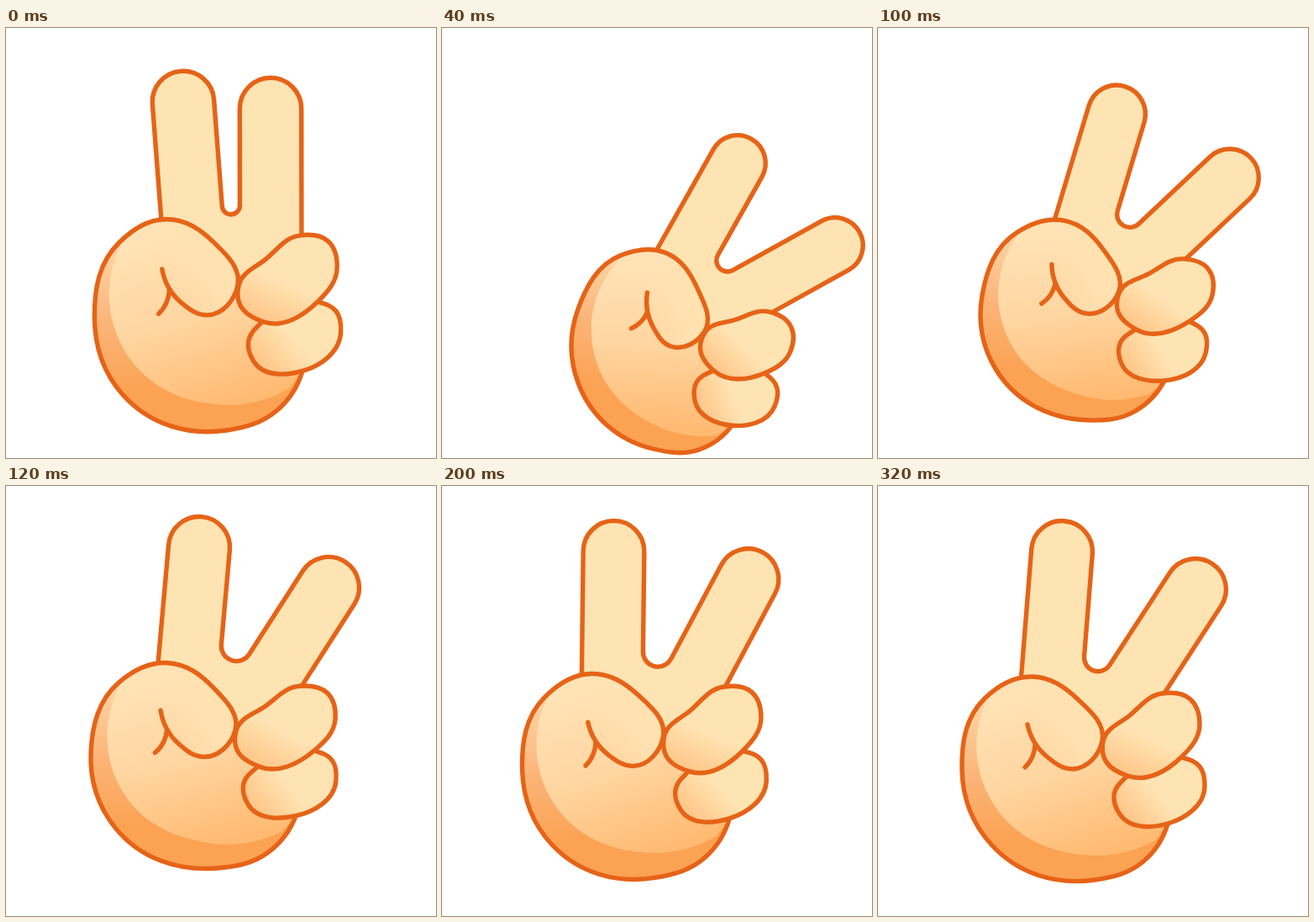
An HTML page with a canvas for the animation above (340 ms loop, 512 by 512 pixels).

```html
<!DOCTYPE html>
<html lang="en">
<head>
<meta charset="utf-8">
<title>Victory hand</title>
<style>
  html, body { margin: 0; width: 100%; height: 100%; overflow: hidden; background: #fff; }
  canvas { display: block; width: 100vw; height: 100vh; }
</style>
</head>
<body>
<canvas id="stage" width="512" height="512"></canvas>
<script>
const ctx = document.getElementById('stage').getContext('2d');
const LOOP = 340, STEP = 20;
const LINE = '#e66317', CREAM = '#ffe4b3';

// Each pose: finger root, palm bottom and right edge place the hand; two tip centres place the fingers.
const poses = [
  { at: 0, hand: [[178, 229], [263, 479], [371, 326]], tips: [[211, 88], [315, 96]] },
  { at: 40, hand: [[255, 264], [251, 501], [384, 411]], tips: [[352, 161], [468, 259]] },
  { at: 80, hand: [[238, 250], [243, 484], [374, 389]], tips: [[332, 140], [450, 236]] },
  { at: 120, hand: [[179, 211], [252, 455], [367, 315]], tips: [[230, 73], [384, 121]] },
  { at: 160, hand: [[160, 219], [252, 461], [355, 308]], tips: [[190, 77], [351, 99]] },
  { at: 240, hand: [[169, 228], [258, 469], [361, 323]], tips: [[219, 78], [378, 123]] }
];
const last = poses.length - 1;
const rest = poses[last].hand;

// Smooth outlines of the resting hand.
const palm = [[178, 284], [202, 323], [232, 337], [267, 303], [238, 254], [183, 227],
  [127, 253], [100, 338], [135, 427], [258, 469], [316, 447], [345, 402]];
const ring = [[268, 304], [300, 273], [338, 247], [372, 254], [383, 284], [361, 323], [297, 345], [269, 323]];
const pinky = [[361, 323], [383, 334], [389, 358], [345, 402], [288, 391], [281, 368], [297, 345]];
const crease = [[187, 307], [184, 322], [175, 335]];
const shadeEdge = [[330, 422], [242, 439], [141, 384], [129, 256]];

const add = (p, q, k = 1) => [p[0] + q[0] * k, p[1] + q[1] * k];
const sub = (p, q) => add(p, q, -1);
const cross = (p, q) => p[0] * q[1] - p[1] * q[0];
const dist = (p, q) => Math.hypot(q[0] - p[0], q[1] - p[1]);
const unit = p => add([0, 0], p, 1 / (Math.hypot(...p) || 1));

// Carries a point of the resting hand to where the three anchors have moved.
function place([o, a, b]) {
  const u = sub(rest[1], rest[0]), v = sub(rest[2], rest[0]), area = cross(u, v);
  return p => {
    const d = sub(p, rest[0]);
    return add(add(o, sub(a, o), cross(d, v) / area), sub(b, o), cross(u, d) / area);
  };
}

// Monotone cubic through the values that pick() reads from the poses.
function tween(pick, t) {
  if (t >= poses[last].at) return pick(poses[last]);
  const span = i => poses[i + 1].at - poses[i].at;
  const slope = i => (pick(poses[i + 1]) - pick(poses[i])) / span(i);
  const tangent = i => {
    if (i === 0) return slope(0);
    if (i === last) return 0;
    const a = slope(i - 1), b = slope(i);
    return a * b <= 0 ? 0 : 2 * a * b / (a + b);
  };
  let i = 0;
  while (t >= poses[i + 1].at) i++;
  const h = span(i), u = (t - poses[i].at) / h, w = 1 - u;
  return pick(poses[i]) * w * w * (1 + 2 * u) + pick(poses[i + 1]) * u * u * (3 - 2 * u)
    + h * u * w * (tangent(i) * w - tangent(i + 1) * u);
}

const pointsAt = (key, t) =>
  rest.slice(0, poses[0][key].length).map((_, i) => [0, 1].map(a => tween(p => p[key][i][a], t)));

// Adds a round curve through pts to a path.
function curve(path, pts, closed = false, join = false) {
  const n = pts.length, at = i => pts[(i + n) % n];
  const turn = i => {
    const a = unit(sub(at(i), at(i - 1))), b = unit(sub(at(i + 1), at(i)));
    const d = dist(at(i), at(i - 1)), e = dist(at(i), at(i + 1));
    return unit(add(add([0, 0], a, e), b, d));
  };
  const mirror = (m, p, q) => {
    const c = unit(sub(q, p));
    return sub(add([0, 0], c, 2 * (c[0] * m[0] + c[1] * m[1])), m);
  };
  const dir = i => {
    if (closed || (i > 0 && i < n - 1)) return turn(i);
    return i ? mirror(turn(n - 2), at(n - 2), at(n - 1)) : mirror(turn(1), at(0), at(1));
  };
  if (join) path.lineTo(...pts[0]); else path.moveTo(...pts[0]);
  for (let i = 0; i < (closed ? n : n - 1); i++) {
    const p = at(i), q = at(i + 1), s = dist(p, q) * 0.36;
    path.bezierCurveTo(...add(p, dir(i), s), ...sub(q, add([0, 0], dir(i + 1), s)), ...q);
  }
  if (closed) path.closePath();
  return path;
}

const smooth = (pts, closed) => curve(new Path2D(), pts, closed);

// Two round-tipped fingers joined by a fillet that ends at the crotch.
function fingers(tips, roots, crotch, r) {
  const squeeze = Math.max(0, (140 - dist(...tips)) / 7);
  const across = unit(sub(roots[1], roots[0]));
  const [a, b] = tips.map((tip, i) => {
    const root = add(roots[i], across, i ? -squeeze : squeeze);
    const axis = unit(sub(tip, root)), side = [axis[1], -axis[0]];
    return { tip, root, axis, side, angle: Math.atan2(side[1], side[0]) };
  });
  const right = add(a.tip, a.side, -r), left = add(b.tip, b.side, r);
  const turn = cross(a.axis, b.axis);
  const corner = add(right, a.axis, cross(sub(left, right), b.axis) / turn);
  const half = Math.sin(Math.asin(Math.abs(turn)) / 2);
  const path = new Path2D();
  path.moveTo(...add(add(a.root, a.side, r), a.axis, -15));
  path.arc(...a.tip, r, a.angle, a.angle + Math.PI);
  path.arcTo(...corner, ...left, dist(corner, crotch) / (1 / half - 1));
  path.arc(...b.tip, r, b.angle, b.angle + Math.PI);
  path.lineTo(...add(add(b.root, b.side, -r), b.axis, -15));
  return path;
}

function paint(path, style) {
  ctx.fillStyle = style;
  ctx.fill(path);
}

function draw(t) {
  const hand = pointsAt('hand', t), tips = pointsAt('tips', t);
  const put = place(hand), all = pts => pts.map(put);
  const tone = (from, to, ...colors) => {
    const g = ctx.createLinearGradient(...put(from), ...put(to));
    colors.forEach((c, i) => g.addColorStop(i / (colors.length - 1), c));
    return g;
  };

  ctx.fillStyle = '#fff';
  ctx.fillRect(0, 0, 512, 512);
  ctx.strokeStyle = LINE;
  ctx.lineWidth = 5.4;
  ctx.lineCap = ctx.lineJoin = 'round';

  const width = dist(hand[0], hand[2]) * 0.17;
  const raised = fingers(tips, all([[207, 228], [309, 229]]), put([262, 222]), width);
  const back = new Path2D(raised);
  back.lineTo(...put(palm[3]));
  paint(back, CREAM);
  ctx.stroke(raised);

  const outline = all(palm);
  const body = smooth(outline.slice(3));
  body.lineTo(...put([318, 345]));
  body.closePath();
  paint(body, tone([195, 235], [262, 440], '#ffe3b6', '#ffd5a0', '#ffba72'));

  const shade = smooth(outline.slice(6));
  curve(shade, all(shadeEdge), false, true);
  ctx.save();
  ctx.clip(body);
  paint(shade, tone([135, 262], [150, 425], '#fdd3a4', '#fbb478', '#fba253'));
  ctx.restore();

  paint(smooth(outline.slice(0, 6)), tone([190, 305], [243, 285], 'rgba(255,226,178,0)', '#ffe2b0'));
  ctx.stroke(smooth(outline));
  ctx.stroke(smooth(all(crease)));

  const curled = [[pinky, [297, 393], [331, 362]], [ring, [288, 338], [308, 293]]];
  for (const [pts, from, to] of curled) {
    const shape = smooth(all(pts), true);
    paint(shape, tone(from, to, '#ffc78a', CREAM));
    ctx.stroke(shape);
  }
}

let shown = -1;
function tick() {
  const t = Math.floor(performance.now() % LOOP / STEP) * STEP;
  if (t !== shown) draw(shown = t);
  requestAnimationFrame(tick);
}
tick();
</script>
</body>
</html>
```
